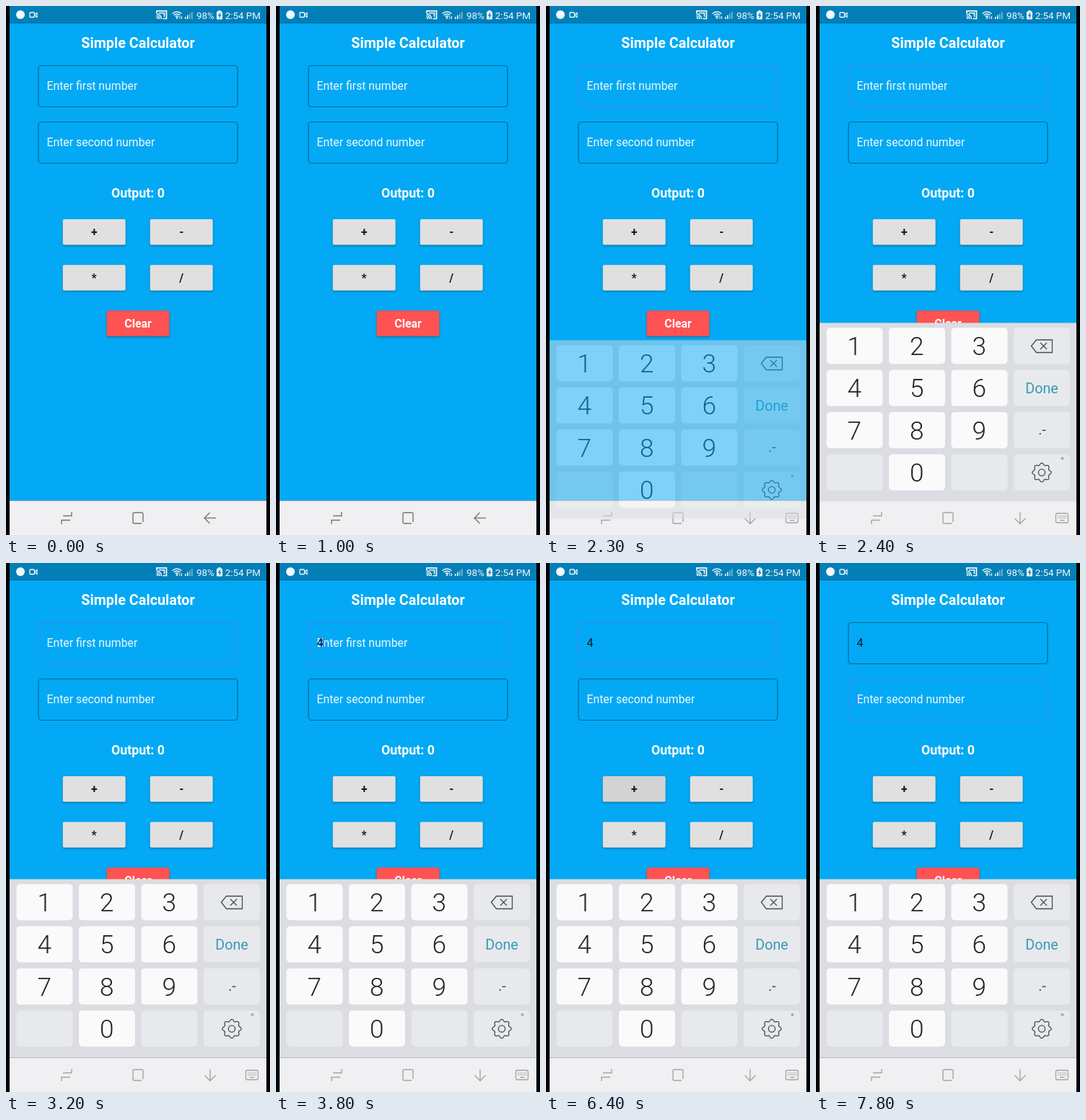
Animation of 366 by 732 pixels, one loop 8 s. Source, as an HTML page with a canvas:

```html
<!DOCTYPE html>
<html lang="en">
<head>
<meta charset="utf-8">
<title>Simple Calculator</title>
<style>
html, body { margin: 0; width: 100%; height: 100%; overflow: hidden; background: #000; }
canvas { display: block; width: 366px; height: 732px; }
</style>
</head>
<body>
<canvas id="stage" width="366" height="732"></canvas>
<script>
const LOOP = 8000, STEP = 100;
const BLUE = '#03a9f4', FOCUS = '#2196f3', CARET = '#4285f4';
const NAV_TOP = 684.5, PAD_TOP = 437.5;
const stage = document.getElementById('stage');
const pad = stage.cloneNode();
let ctx = stage.getContext('2d');

const ramp = (t, a, b) => Math.min(1, Math.max(0, (t - a) / (b - a)));
const within = (t, ...spans) => spans.some(([a, b]) => t >= a && t < b);
const mix = (a, b, p) => a + (b - a) * p;
const gray = v => `rgb(${v},${v},${v})`;

function rect(x, y, w, h, color) {
  ctx.fillStyle = color;
  ctx.fillRect(x, y, w, h);
}

function round(x, y, w, h, r) {
  ctx.beginPath();
  ctx.roundRect(x, y, w, h, r);
}

function text(s, x, y, size, color, weight = 400, align = 'left') {
  ctx.font = `${weight} ${size}px Roboto, sans-serif`;
  ctx.textAlign = align;
  ctx.fillStyle = color;
  ctx.fillText(s, x, y);
}

function line(points, color, width = 1.2, close = false) {
  ctx.beginPath();
  points.forEach(([x, y]) => ctx.lineTo(x, y));
  if (close) ctx.closePath();
  ctx.strokeStyle = color;
  ctx.lineWidth = width;
  ctx.stroke();
}

function layer(alpha, draw) {
  if (alpha <= 0) return;
  ctx.save();
  ctx.globalAlpha *= alpha;
  draw();
  ctx.restore();
}

function dot(x, y, r, color) {
  ctx.beginPath();
  ctx.arc(x, y, r, 0, Math.PI * 2);
  ctx.fillStyle = color;
  ctx.fill();
}

function statusBar() {
  const white = '#f2f8fc';
  rect(5, 0, 356, 23.7, '#027fb7');
  dot(20, 12, 6, white);
  ctx.strokeStyle = white;
  ctx.lineWidth = 1.3;
  round(33, 9, 6.5, 6.5, 1);
  ctx.stroke();
  line([[40, 12], [43, 9.5], [43, 15.5], [40, 13]], white);

  // cast
  line([[209, 10], [209, 6.8], [222.5, 6.8], [222.5, 17.5], [217.5, 17.5]], white, 1.7);
  line([[212, 9.7], [219.5, 9.7], [219.5, 15]], white, 1.6);
  for (const r of [2, 4.5, 7]) {
    ctx.beginPath();
    ctx.arc(208.5, 18, r, -Math.PI / 2, 0);
    ctx.stroke();
  }

  // wifi and signal
  ctx.lineWidth = 1.4;
  for (const r of [3, 6, 9]) {
    ctx.beginPath();
    ctx.arc(237, 17, r, -Math.PI * 0.75, -Math.PI * 0.25);
    ctx.stroke();
  }
  dot(237, 16.5, 1.3, white);
  line([[241, 14], [241, 18]], white, 1);
  line([[243.5, 14], [243.5, 18]], white, 1);
  for (let i = 0; i < 4; i++) {
    rect(248 + i * 3, 15 - i * 2.3, 1.6, 3 + i * 2.3, i < 2 ? white : 'rgba(242,248,252,.5)');
  }

  text('98%', 264, 17.5, 13.4, white);
  rect(294.5, 6, 3, 2, white);
  round(292, 7.5, 8, 11, 1);
  ctx.fillStyle = white;
  ctx.fill();
  line([[297, 9.5], [295, 13], [297.5, 13], [295.5, 16.5]], '#027fb7', 1.3);
  text('2:54 PM', 353, 17.5, 13.4, white, 400, 'right');
}

function field(y, hint, hintAlpha, value, focus, caretX) {
  ctx.strokeStyle = 'rgba(0,0,0,.38)';
  ctx.lineWidth = 1.2;
  layer(1 - focus, () => { round(45, y + .5, 276, 57, 4); ctx.stroke(); });
  ctx.strokeStyle = FOCUS;
  ctx.lineWidth = 2;
  layer(focus, () => { round(45, y + .5, 276, 57, 4); ctx.stroke(); });
  layer(hintAlpha, () => text(hint, 56.5, y + 34, 15.8, '#eef8fe'));
  text(value, 56.5, y + 34, 15.8, 'rgba(0,0,0,.87)');
  if (caretX) rect(caretX, y + 20, 2, 18, CARET);
}

function button(x, y, label, color, ink, press = 0) {
  ctx.save();
  ctx.shadowColor = 'rgba(0,0,0,.35)';
  ctx.shadowBlur = 3;
  ctx.shadowOffsetY = 1.2;
  round(x, y, 87, 35.5, 2);
  ctx.fillStyle = color;
  ctx.fill();
  ctx.restore();
  layer(press, () => {
    round(x, y, 87, 35.5, 2);
    ctx.fillStyle = 'rgba(0,0,0,.06)';
    ctx.fill();
  });
  text(label, x + 43.5, y + 23.3, 15.8, ink, 700, 'center');
}

function page(t) {
  rect(5, 23.7, 356, NAV_TOP - 23.7, BLUE);
  text('Simple Calculator', 183, 58, 19.8, '#fff', 700, 'center');

  const leave = ramp(t, 7000, 7200);
  const typed = t >= 3800;
  const early = within(t, [2800, 3200], [3700, 3800]);
  const late = within(t, [3800, 4200], [4700, 5100]);
  field(82, 'Enter first number', t < 3900 ? 1 : 0, typed ? '4' : '',
    ramp(t, 1900, 2100) - leave, early ? 56 : late ? 65 : 0);
  field(160, 'Enter second number', 1, '', leave, t >= 7600 ? 56 : 0);

  text('Output: 0', 183, 265, 17.8, '#fff', 700, 'center');
  const press = ramp(t, 6100, 6400) - ramp(t, 6400, 6800);
  const ink = 'rgba(0,0,0,.87)';
  button(78.7, 295, '+', '#e0e0e0', ink, press);
  button(199.7, 295, '-', '#e0e0e0', ink);
  button(78.7, 358.3, '*', '#e0e0e0', ink);
  button(199.7, 358.3, '/', '#e0e0e0', ink);
  button(139.5, 421.5, 'Clear', '#ff5252', '#fff');
}

function navBar(open) {
  const ink = gray(Math.round(mix(118, 164, open)));
  rect(5, NAV_TOP, 356, 732 - NAV_TOP, '#f0f0f2');
  line([[91, 700], [91, 705.5], [79, 705.5]], ink, 1.4);
  line([[77, 717], [77, 711.5], [89, 711.5]], ink, 1.4);
  ctx.lineWidth = 1.4;
  ctx.beginPath();
  ctx.moveTo(190, 714);
  ctx.arcTo(190, 701, 176, 701, 2);
  ctx.arcTo(176, 701, 176, 716, 2);
  ctx.arcTo(176, 716, 188, 716, 2);
  ctx.lineTo(188, 716);
  ctx.stroke();

  ctx.save();
  ctx.translate(283, 708.5);
  ctx.rotate(-Math.PI / 2 * open);
  line([[8, 0], [-8, 0]], ink, 1.4);
  line([[-.5, -7.5], [-8, 0], [-.5, 7.5]], ink, 1.4);
  ctx.restore();

  layer(open, () => {
    ctx.strokeStyle = ink;
    ctx.lineWidth = 1.3;
    round(332.5, 702, 17, 13, 2);
    ctx.stroke();
    for (let i = 0; i < 10; i++) {
      rect(335.3 + i % 5 * 2.6, 705 + Math.floor(i / 5) * 2.7, 1.4, 1.4, ink);
    }
    rect(338, 711, 6.5, 1.3, ink);
  });
}

function gear(x, y) {
  const points = [];
  for (let i = 0; i < 96; i++) {
    const a = i * Math.PI / 48, r = 11.8 + 1.4 * Math.cos(8 * a);
    points.push([x + r * Math.cos(a), y + r * Math.sin(a)]);
  }
  line(points, '#4a4c50', 1.3, true);
  ctx.beginPath();
  ctx.arc(x, y, 4.6, 0, Math.PI * 2);
  ctx.stroke();
}

function keys(t) {
  rect(5, PAD_TOP, 356, NAV_TOP - PAD_TOP, '#dbdde2');
  const labels = ['1', '2', '3', '', '4', '5', '6', '', '7', '8', '9', '', '', '0', '', ''];
  labels.forEach((label, i) => {
    const x = 14.5 + i % 4 * 86.5, y = 444.3 + Math.floor(i / 4) * 58.3;
    const down = label === '4' && within(t, [3400, 3500]);
    round(x, y, 78, 50, 5);
    ctx.fillStyle = down ? '#cfd1d6' : label ? '#fafafb' : '#e7e9ed';
    ctx.fill();
    text(label, x + 38.7, y + 37.6, 35.2, '#222426', 300, 'center');
  });
  const ink = '#4a4c50';
  line([[298.5, 469.5], [305.5, 461], [327.5, 461], [327.5, 478.5], [305.5, 478.5]], ink, 1.3, true);
  line([[311, 465], [320, 474]], ink, 1.3);
  line([[320, 465], [311, 474]], ink, 1.3);
  text('Done', 313, 535, 19.8, '#3a9ab6', 400, 'center');
  text('.-', 313.5, 592, 19.8, ink, 400, 'center');
  gear(313, 644.5);
  dot(341.5, 625, 2, '#a6a8ad');
}

// the pad is painted apart so that it fades in as one sheet
function keyboard(t) {
  if (t < 2300) return;
  const drop = Math.round(25 ** (1 - (t - 2300) / 100));
  const screen = ctx;
  ctx = pad.getContext('2d');
  ctx.clearRect(0, 0, 366, 732);
  keys(t);
  ctx = screen;
  layer(ramp(t, 2200, 2400), () => ctx.drawImage(pad, 0, drop));
}

function draw(now) {
  const t = Math.floor(now % LOOP / STEP) * STEP;
  rect(0, 0, 366, 732, '#000');
  page(t);
  statusBar();
  navBar(ramp(t, 1900, 2200));
  keyboard(t);
}

let start;
function tick(now) {
  start ??= now;
  draw(now - start);
  requestAnimationFrame(tick);
}
draw(0);
requestAnimationFrame(tick);
</script>
</body>
</html>
```
